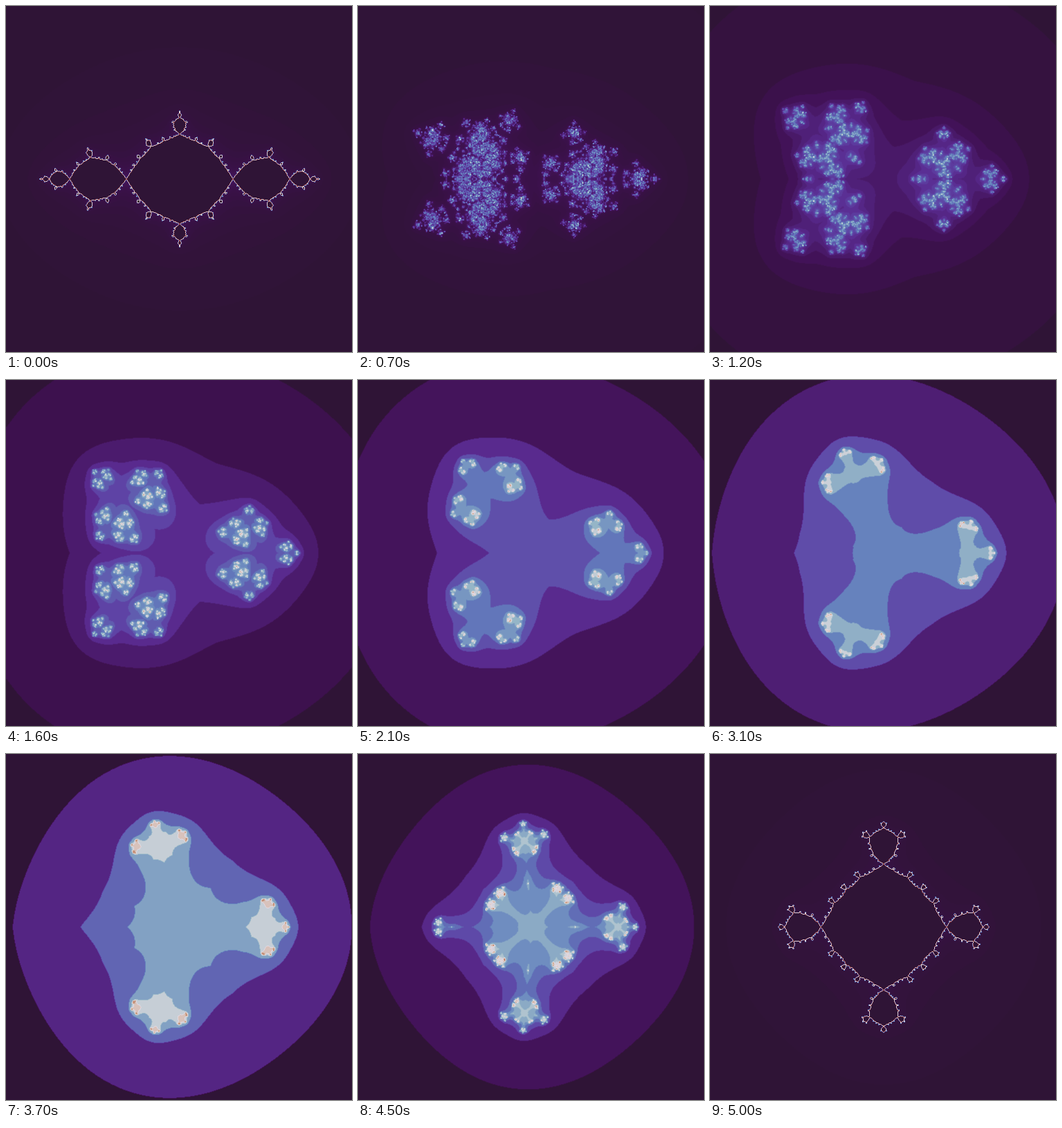
Animation, 500 px wide and 500 px high, one loop 5.1 s. Source, as an HTML page with a canvas:

```html
<!DOCTYPE html>
<html lang="en">
<head>
<meta charset="utf-8">
<title>Julia sets of z^p - 1</title>
<style>
  html, body { margin: 0; width: 100%; height: 100%; overflow: hidden; background: #2f1436; }
  canvas { display: block; width: 500px; height: 500px; }
</style>
</head>
<body>
<canvas id="stage" width="500" height="500"></canvas>
<script>
const SIZE = 500, MID = SIZE / 2, UNIT = 125;
const FRAMES = 51, STEP = 100;
const LIMIT = 256, BAIL = 100;    // iteration cap, squared escape radius

// Cyclic dark - blue - white - red - dark colour scale
const STOPS = [
  [0, '2f1436'], [.028, '381145'], [.0556, '421257'], [.125, '592a8f'],
  [.1667, '5e43a5'], [.25, '6276ba'], [.2778, '6785be'], [.375, '95b5c7'],
  [.3889, '9ebbc9'], [.4444, 'c6ced6'], [.5, 'e2d9e2'], [.6111, 'ceac94'],
  [.625, 'cca389'], [.7222, 'ba6657'], [.75, 'b25652'], [.8333, '8e2c50'],
  [.875, '741e4f'], [.9444, '471340'], [1, '2f1436']
].map(([s, hex]) => [s, [0, 2, 4].map(i => parseInt(hex.slice(i, i + 2), 16))]);

const COLOURS = 510;
const palette = new Uint32Array(COLOURS).map((_, i) => {
  const s = i / (COLOURS - 1);
  let k = 1;
  while (STOPS[k][0] < s) k++;
  const [s0, from] = STOPS[k - 1], [s1, to] = STOPS[k];
  const u = (s - s0) / (s1 - s0);
  const [r, g, b] = from.map((v, c) => Math.round(v + (to[c] - v) * u));
  return (255 << 24 | b << 16 | g << 8 | r) >>> 0;
});

// Steps until z -> z^p - 1 leaves the escape radius
function escapeLevel(x, y, p) {
  const captured = p % 2 === 0;   // 0 and -1 form an attracting cycle
  let r2 = x * x + y * y;
  for (let i = 0; i < LIMIT; i++) {
    const m = Math.exp(p / 2 * Math.log(r2));
    const a = p * Math.atan2(y, x);
    x = m * Math.cos(a) - 1;
    y = m * Math.sin(a);
    r2 = x * x + y * y;
    if (r2 > BAIL) return i;
    if (captured && r2 < 1e-4) break;
  }
  return LIMIT - 1;
}

// Upper half of the plane, down to and including the real axis
function levels(p) {
  const map = new Uint8Array(SIZE * (MID + 1));
  for (let row = 0; row <= MID; row++)
    for (let col = 0; col < SIZE; col++)
      map[row * SIZE + col] = escapeLevel((col - MID) / UNIT, (MID - row) / UNIT, p);
  return map;
}

function render(n) {
  const map = levels(2 + n / 25);
  let min = LIMIT, max = 0;
  for (const v of map) {
    if (v < min) min = v;
    if (v > max) max = v;
  }
  const scale = COLOURS / (max - min);

  // Each pixel lies midway between four samples; the lower half mirrors the upper
  const image = new ImageData(SIZE, SIZE);
  const px = new Uint32Array(image.data.buffer);
  for (let y = 0; y < MID; y++)
    for (let x = 0; x < SIZE; x++) {
      const i = y * SIZE + x, left = x ? i - 1 : i;
      const v = (map[left] + map[i] + map[left + SIZE] + map[i + SIZE]) / 4;
      const k = Math.min(COLOURS - 1, Math.floor((v - min) * scale));
      px[i] = px[(SIZE - 1 - y) * SIZE + x] = palette[k];
    }
  return image;
}

const ctx = document.getElementById('stage').getContext('2d');
const cache = [];
const start = performance.now();
let shown = -1;

function draw() {
  const t = performance.now() - start;
  const n = Math.floor(t / STEP) % FRAMES;
  if (n !== shown) {
    cache[n] = cache[n] || render(n);
    ctx.putImageData(cache[n], 0, 0);
    shown = n;
  }
  requestAnimationFrame(draw);
}
draw();
</script>
</body>
</html>
```
